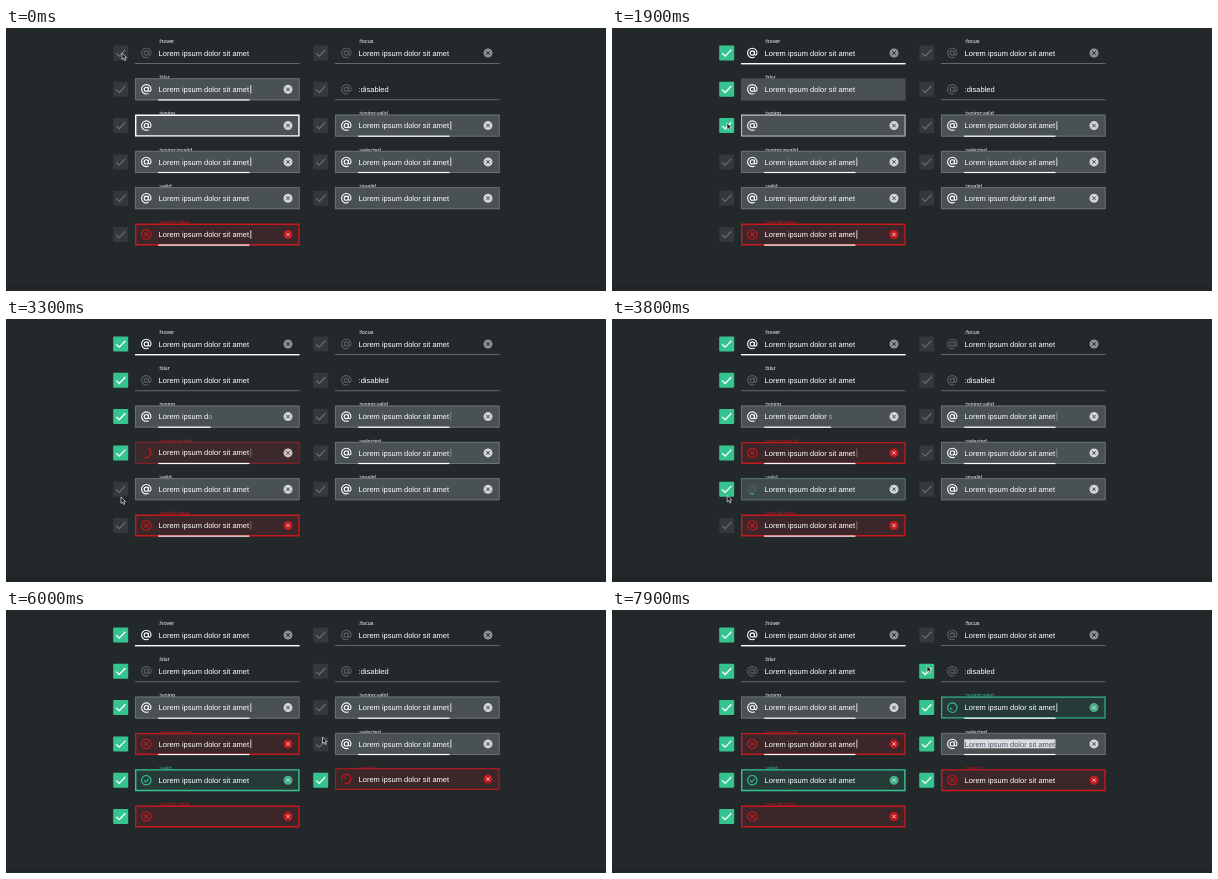
These frames come from a looping animation (600x263 px, 8 s). An HTML page with a canvas:

```html
<!DOCTYPE html>
<html lang="en">
<head>
<meta charset="utf-8">
<title>Form field states</title>
<style>
html, body { margin: 0; width: 100%; height: 100%; overflow: hidden; background: #23292b; }
canvas { display: block; width: 600px; height: 263px; }
</style>
</head>
<body>
<canvas id="stage"></canvas>
<script>
const LOOP = 8, W = 600, H = 263, TAU = Math.PI * 2;
const TEXT = 'Lorem ipsum dolor sit amet';
const FONT = '"Liberation Sans", Arial, sans-serif';
const BG = 0x23292b, WHITE = 0xffffff, FILL = 0x4a5152, EDGE = 0x757b7c, DIM = 0x5c6264;
const RED = 0xc3191f, RED_BG = 0x3b2729, GREEN = 0x35c490, GREEN_BG = 0x263a37;

// column, row, kind, click time
const fields = [
  [0, 0, 'hover', .35], [0, 1, 'blur', 1.25], [0, 2, 'typing', 1.75],
  [0, 3, 'typing:invalid', 2.85], [0, 4, 'valid', 3.55], [0, 5, 'invalid:clear', 4.2],
  [1, 0, 'focus', 99], [1, 1, 'disabled', 7.65], [1, 2, 'typing:valid', 7.15],
  [1, 3, 'selected', 6.3], [1, 4, 'invalid', 5.35]
];

// pointer stops: time, x, y
const stops = [
  [0, 116, 25], [.4, 116, 25], [1, 116, 59], [1.35, 116, 59], [1.7, 115, 95], [2, 115, 95],
  [2.6, 116, 131], [2.95, 116, 131], [3.3, 115, 178], [3.5, 115, 169], [3.7, 115, 169],
  [4.05, 116, 206], [4.3, 116, 206], [4.7, 298, 181], [5.2, 316, 168], [5.5, 316, 168],
  [6, 316.5, 127], [6.45, 316, 131], [6.9, 311.5, 89.5], [7.1, 314, 95], [7.25, 314, 95],
  [7.6, 315, 57], [8, 315, 55.5]
];

const canvas = document.getElementById('stage'), c = canvas.getContext('2d');
const dpr = window.devicePixelRatio || 1;
canvas.width = W * dpr;
canvas.height = H * dpr;

const clamp = v => Math.max(0, Math.min(1, v));
const ramp = (t, a, b) => { const k = clamp((t - a) / (b - a)); return k * k * (3 - 2 * k); };
const css = n => '#' + n.toString(16).padStart(6, '0');
const mix = (a, b, k) => [16, 8, 0].reduce((sum, s) => {
  const u = a >> s & 255, v = b >> s & 255;
  return sum | Math.round(u + (v - u) * k) << s;
}, 0);

function stroke(color, width, path) {
  c.strokeStyle = css(color);
  c.lineWidth = width;
  c.beginPath();
  path();
  c.stroke();
}
function rect(x, y, w, h, color) {
  c.fillStyle = css(color);
  c.fillRect(x, y, w, h);
}
function write(str, x, y, size, color) {
  c.font = size + 'px ' + FONT;
  c.fillStyle = css(color);
  c.fillText(str, x, y);
}
function faded(alpha, draw) {
  if (alpha <= 0) return;
  c.save();
  c.globalAlpha = alpha;
  draw();
  c.restore();
}
// polyline drawn up to share k of its length
function trace(points, k) {
  const lens = points.slice(1).map((p, i) => Math.hypot(p[0] - points[i][0], p[1] - points[i][1]));
  let left = k * lens.reduce((a, b) => a + b);
  c.moveTo(...points[0]);
  lens.forEach((len, i) => {
    if (left <= 0) return;
    const f = Math.min(1, left / len), [a, b] = points[i], [d, e] = points[i + 1];
    c.lineTo(a + (d - a) * f, b + (e - b) * f);
    left -= len;
  });
}

function checkbox(x, y, k) {
  c.fillStyle = css(mix(0x343a3c, GREEN, k));
  c.beginPath();
  c.roundRect(x - 7.5, y - 7.5, 15, 15, 1);
  c.fill();
  stroke(mix(0x666c6e, WHITE, k), 1.3, () => trace([[x - 4.5, y + .3], [x - 1.5, y + 3.2], [x + 4.7, y - 3.3]], 1));
}

function atSign(x, y, color) {
  stroke(color, 1.1, () => {
    c.arc(x, y, 2.1, 0, TAU);
    c.moveTo(x + 2.1, y - 2.1);
    c.lineTo(x + 2.1, y + .7);
    c.bezierCurveTo(x + 2.1, y + 2.7, x + 4.7, y + 2.7, x + 4.7, y);
    c.arc(x, y, 4.7, 0, 1.05, true);
  });
}

function statusIcon(x, y, p, good) {
  const color = good ? GREEN : RED, ring = ramp(p, .1, .8);
  faded(1 - ramp(p, .05, .3), () => atSign(x, y, WHITE));
  if (ring) stroke(color, 1.1, () => c.arc(x, y, 4.7, 2 - TAU * ring, 2));
  const a = ramp(p, .5, .8), b = ramp(p, .7, 1);
  stroke(color, 1.1, () => {
    if (good) {
      if (a) trace([[x - 2.3, y], [x - .5, y + 1.8], [x + 2.6, y - 1.7]], ramp(p, .55, 1));
    } else {
      if (a) trace([[x - 2, y - 2], [x + 2, y + 2]], a);
      if (b) trace([[x + 2, y - 2], [x - 2, y + 2]], b);
    }
  });
}

function clearButton(x, y, color, cross) {
  c.fillStyle = css(color);
  c.beginPath();
  c.arc(x, y, 4.5, 0, TAU);
  c.fill();
  stroke(cross, 1, () => {
    trace([[x - 1.7, y - 1.7], [x + 1.7, y + 1.7]], 1);
    trace([[x + 1.7, y - 1.7], [x - 1.7, y + 1.7]], 1);
  });
}

function caret(x, y, t, shift) {
  faded(clamp(.4 + .9 * Math.cos(TAU * (t - shift))), () => rect(x + 1.4, y - 4.3, .8, 8.6, WHITE));
}

function drawField([col, row, kind, click], t) {
  const x = 129 + col * 200, y0 = 25 + row * 36.3, p = t - click, on = ramp(p, 0, .15);
  const tx = x + 23.6, clears = kind === 'invalid:clear';
  const good = kind.endsWith('valid') && !kind.includes('invalid'), bad = kind.includes('invalid');
  const sp = clears ? 9 : p;                       // progress of validation
  const tint = good || bad ? ramp(sp, .1, .5) : 0;
  const accent = good ? GREEN : RED;
  const y = y0 + (bad ? -1.2 * Math.sin(Math.PI * clamp((sp - .45) / .4)) : 0);

  checkbox(x - 14.3, y0, on);
  if (kind !== 'disabled') write(':' + kind, tx + .2, y0 - 10.2, 5.5, mix(WHITE, accent, tint));

  const plain = ['hover', 'focus', 'disabled'].includes(kind);
  const blur = kind === 'blur' ? ramp(p, .1, .5) : 0;
  const out = kind === 'blur' ? ramp(p, .6, 1.15) : 0;
  const hover = kind === 'hover' ? ramp(p, 0, .3) : 0;

  if (plain || out) rect(x, y + 10, 164.6, .9 + .5 * hover, mix(0x6a7072, WHITE, hover));
  if (!plain) {
    faded(1 - out, () => rect(x, y - 11, 164.6, 22, mix(FILL, good ? GREEN_BG : RED_BG, tint)));
    const bright = kind === 'typing' ? 1 - ramp(p, 0, .3) : 0;
    const strong = tint ? ramp(sp, .1, 1.1) : 0;
    const edge = tint ? mix(EDGE, mix(BG, accent, .55 + .45 * strong), tint) : mix(EDGE, WHITE, bright);
    const lw = .8 + .6 * Math.max(bright, strong);
    faded(1 - blur, () => stroke(edge, lw, () => c.rect(x + lw / 2, y - 11 + lw / 2, 164.6 - lw, 22 - lw)));
  }

  if (good || bad) statusIcon(x + 11.3, y, sp, good);
  else atSign(x + 11.3, y, plain ? mix(DIM, WHITE, hover) : mix(WHITE, DIM, out));

  // text content
  c.font = '7.5px ' + FONT;
  let count = TEXT.length;
  if (kind === 'typing') count = Math.max(0, Math.min(count, (t - 1.95) * 10));
  const whole = Math.floor(count), head = TEXT.slice(0, whole);
  const width = c.measureText(head).width, next = TEXT[whole] || '';
  const gone = clears ? ramp(p, .1, .4) : 0;
  const picked = kind === 'selected' ? ramp(p, .1, .2) : 0;
  const lineWidth = width + c.measureText(next).width * (count - whole);

  if (!plain && kind !== 'valid' && kind !== 'invalid')
    faded(1 - Math.max(blur, gone), () => rect(tx - .4, y + 10, lineWidth * (1 - gone) + (whole ? .8 : 0), 1.2, WHITE));
  faded(picked, () => rect(tx - .4, y - 4.6, width + .8, 9, 0xdcdce4));
  faded(1 - gone, () => {
    write(kind === 'disabled' ? ':disabled' : head, tx, y + 2.6, 7.5, mix(WHITE, 0x555b66, picked));
    faded(count - whole, () => write(next, tx + width, y + 2.6, 7.5, WHITE));
  });

  if (kind === 'typing' ? whole === TEXT.length : kind.startsWith('typing:') ||
      kind === 'blur' && blur < .3 || kind === 'selected' && !picked || clears && !gone)
    caret(tx + width, y, t, kind === 'typing' ? -.05 : .05);

  // clear button
  if (kind === 'disabled') return;
  const shown = kind === 'hover' ? hover : 1 - blur;
  const done = tint ? ramp(sp, .4, .65) : 0;
  const base = plain ? 0x8b9091 : 0xd2d5d5;
  faded(shown, () => clearButton(x + 153, y, mix(base, good ? 0x45ae88 : RED, done),
    mix(plain ? BG : 0x3f4546, good ? 0xc8e4da : 0xf0c4c4, done)));
}

function pointer(t) {
  const i = stops.findIndex((s, n) => n && t <= s[0]);
  const [ta, xa, ya] = stops[i - 1], [tb, xb, yb] = stops[i], k = ramp(t, ta, tb);
  c.save();
  c.translate(xa + (xb - xa) * k, ya + (yb - ya) * k);
  c.beginPath();
  c.moveTo(0, 0);
  [[0, 6.4], [1.5, 5.1], [2.6, 7.5], [3.7, 7], [2.7, 4.7], [4.6, 4.6]].forEach(q => c.lineTo(...q));
  c.closePath();
  c.fillStyle = '#111';
  c.fill();
  c.strokeStyle = '#e8e8e8';
  c.lineWidth = .7;
  c.stroke();
  c.restore();
}

function draw() {
  const t = performance.now() / 1000 % LOOP;
  c.setTransform(dpr, 0, 0, dpr, 0, 0);
  c.textRendering = 'geometricPrecision';
  rect(0, 0, W, H, BG);
  rect(0, 258, W, 5, 0x202527);
  fields.forEach(f => drawField(f, t));
  pointer(t);
  requestAnimationFrame(draw);
}
draw();
</script>
</body>
</html>
```
